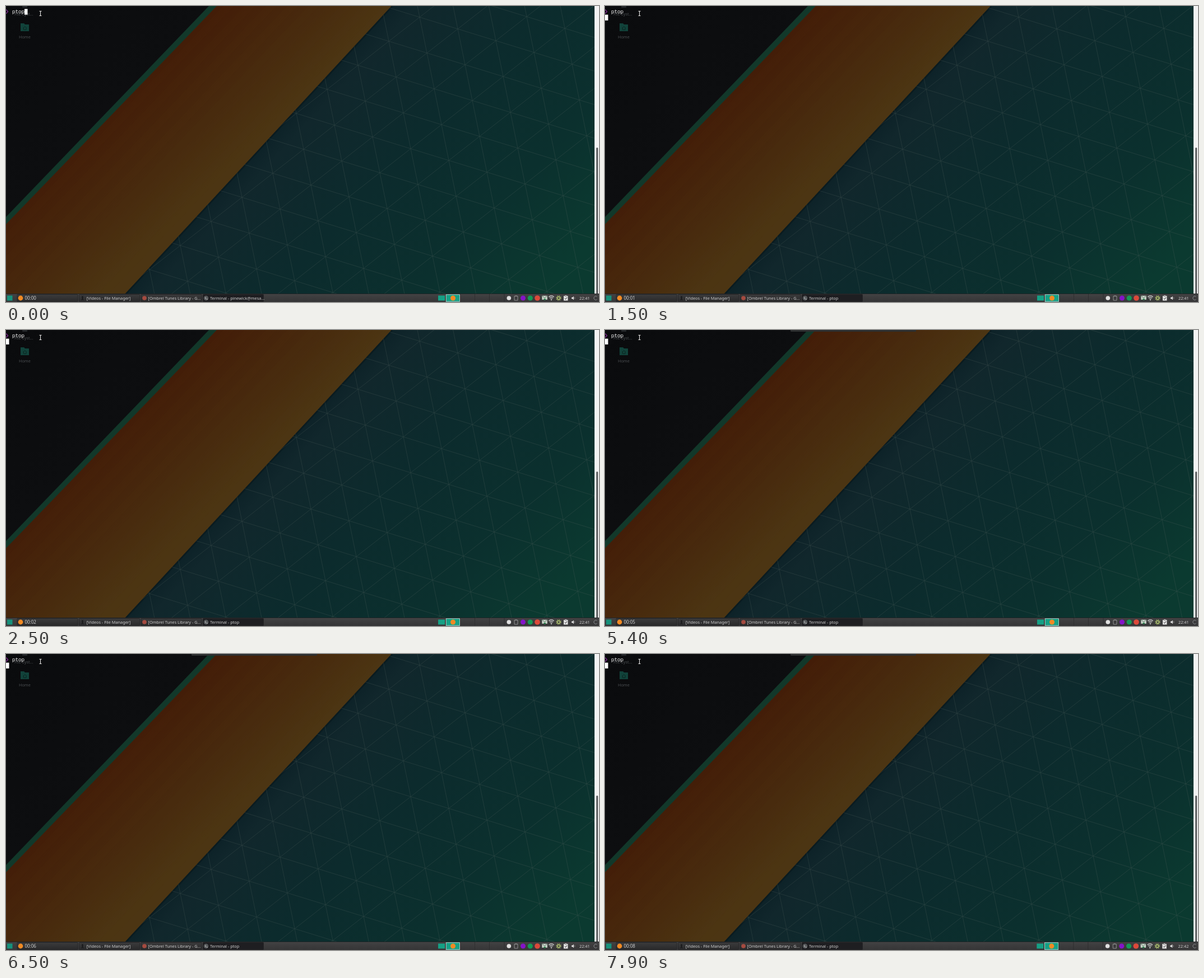
An HTML page that plays this animation: 1058 by 529 pixels, repeating every 8 s.

```html
<!DOCTYPE html>
<html lang="en">
<head>
<meta charset="utf-8">
<title>Terminal desktop</title>
<style>
  html, body { margin: 0; width: 100%; height: 100%; overflow: hidden; background: #0b0c0e; }
  svg { display: block; width: 1058px; height: 529px; }
  text { font: 7.33px "Noto Sans", "Open Sans", sans-serif; fill: #cfcfcf; white-space: pre; }
  .mono { font: 9.2px "Noto Sans Mono", "DejaVu Sans Mono", monospace; fill: #f4f4f4; }
  .dim { fill: #4a4d50; }
</style>
</head>
<body>
<svg viewBox="0 0 1058 529" xmlns="http://www.w3.org/2000/svg">
  <defs>
    <linearGradient id="black" gradientUnits="userSpaceOnUse" x1="0" y1="0" x2="185" y2="190">
      <stop offset="0" stop-color="#0a0b0d"/><stop offset="1" stop-color="#0d0e10"/>
    </linearGradient>
    <linearGradient id="orange" gradientUnits="userSpaceOnUse" x1="188" y1="195" x2="338" y2="346">
      <stop offset="0" stop-color="#431d08"/><stop offset=".5" stop-color="#47280d"/>
      <stop offset="1" stop-color="#4c3513"/>
    </linearGradient>
    <linearGradient id="teal" gradientUnits="userSpaceOnUse" x1="450" y1="257" x2="850" y2="627">
      <stop offset="0" stop-color="#0d2228"/><stop offset=".06" stop-color="#11272c"/>
      <stop offset=".35" stop-color="#0c2b2d"/><stop offset=".7" stop-color="#0b302e"/>
      <stop offset="1" stop-color="#0b3a30"/>
    </linearGradient>
    <linearGradient id="panel" x2="0" y2="1">
      <stop offset="0" stop-color="#4a4a4a"/><stop offset=".15" stop-color="#404041"/>
      <stop offset="1" stop-color="#353536"/>
    </linearGradient>
    <linearGradient id="button" x2="0" y2="1">
      <stop offset="0" stop-color="#3b3b3c"/><stop offset="1" stop-color="#29292a"/>
    </linearGradient>
    <clipPath id="tealArea"><path d="M688 0H1050V515H212Z"/></clipPath>
    <clipPath id="bandArea"><path d="M376 0H688L212 515H0V390Z"/></clipPath>
  </defs>

  <rect width="1050" height="515" fill="url(#black)"/>
  <path d="M362 0H378L0 392V377Z" fill="#12382a"/>
  <path d="M376 0H688L212 515H0V390Z" fill="url(#orange)"/>
  <g id="bands" clip-path="url(#bandArea)" stroke="#5a3a10" stroke-width="14" opacity=".07"/>
  <path d="M688 0H1050V515H212Z" fill="url(#teal)"/>
  <g clip-path="url(#tealArea)">
    <path d="M688 0L212 515" stroke="#071518" stroke-width="5" opacity=".45"/>
    <g id="grid" stroke="#53635f" stroke-width=".7" opacity=".42"/>
  </g>

  <rect x="29" y="0" width="9" height="3" rx="1" fill="#24272a"/>
  <text class="dim" x="15" y="17">File Syst...</text>
  <path d="M26 31H32L34 33H41V45H26Z" fill="#11423a"/>
  <path d="M30.5 39.5L33.7 36.5 37 39.5M31.5 39V42.5H36V39" fill="none" stroke="#0a2521"/>
  <text class="dim" x="23" y="57.5">Home</text>

  <path d="M.3 6.5L3.6 10 .3 13.5" fill="none" stroke="#8b2a9c" stroke-width="1.1"/>
  <text class="mono" x="11" y="13.3">ptop</text>
  <rect id="cursor" width="5.5" height="10.3" fill="#fff"/>
  <g fill="none">
    <path d="M59 9.3H64M61.5 9.3V17.3M59 17.3H64" stroke="#111" stroke-width="2.4"/>
    <path d="M59.5 9.3H63.5M61.5 9.3V17.3M59.5 17.3H63.5" stroke="#eee"/>
  </g>
  <path id="popup" d="M331 0H555V1.5Q555 3 553.5 3H332.5Q331 3 331 1.5Z" fill="#2d2f30"/>

  <rect x="1050" width="8" height="515" fill="#f3f3f3"/>
  <rect x="1053.2" y="253" width="3" height="262" rx="1.5" fill="#56585a"/>

  <rect y="514.5" width="1058" height="14.5" fill="url(#panel)"/>
  <rect y="514" width="1058" height="1" fill="#222426"/>
  <rect x="2" y="517.5" width="9.5" height="9" fill="#17917b"/>
  <g id="buttons"></g>
  <circle cx="26" cy="522" r="4.4" fill="#f08a24"/>
  <text id="counter" x="33.4" y="525" style="font-size:8px"></text>
  <rect x="134" y="518.5" width="5" height="7" fill="#1d1d1e"/>
  <path d="M134.6 519V525M138.4 519V525" stroke="#777" stroke-width=".6" stroke-dasharray="1"/>
  <text x="143.7" y="525">[Videos - File Manager]</text>
  <circle cx="247" cy="522" r="3.8" fill="#a54b40"/>
  <text x="253.5" y="525">[Ombrel Tunes Library - G...</text>
  <circle cx="357" cy="522" r="4.2" fill="#55585a"/>
  <path d="M355 520.2L357 522 355 523.8M357.5 524H360" fill="none" stroke="#ddd" stroke-width=".8"/>
  <text id="title" x="364" y="525"></text>

  <g id="tray">
    <rect x="771" y="517.5" width="12" height="9" fill="#16a085"/>
    <rect x="785.2" y="515.8" width="24.3" height="12.4" fill="#16a085" stroke="#c9e5df" stroke-width=".8"/>
    <circle cx="797.5" cy="522" r="4.5" fill="#f08a24"/>
    <path d="M810.5 515V529M836.5 515V529M862.5 515V529M889 515V529" stroke="#2d2d2e" stroke-width=".8"/>
    <circle cx="897.3" cy="522" r="3.8" fill="#e0e0e0"/>
    <path d="M907 518.5H913V526H907ZM908.5 518H911.5" fill="none" stroke="#929292"/>
    <circle cx="922.5" cy="522" r="4.5" fill="#8414c8"/>
    <circle cx="935.3" cy="522" r="4.6" fill="#139b55"/>
    <circle cx="948" cy="522" r="4.8" fill="#dc493a"/>
    <rect x="956.3" y="517.8" width="9.5" height="7" fill="#c9d4c9"/>
    <path d="M956.5 518L961 521.7 965.6 518" fill="none" stroke="#557260"/>
    <path d="M959 523H963.5L961.2 526.5Z" fill="#28814b"/>
    <g fill="none" stroke="#dedede" stroke-width="1.1">
      <path d="M968.3 520Q973 515.8 977.7 520M969.9 522Q973 519.3 976.1 522M971.5 523.9Q973 522.7 974.5 523.9"/>
    </g>
    <circle cx="973" cy="525.4" r=".9" fill="#dedede"/>
    <circle cx="986" cy="522" r="3.8" fill="none" stroke="#a6b86c" stroke-width="1.8" stroke-dasharray="1.5"/>
    <circle cx="986" cy="522" r="2.3" fill="none" stroke="#a6b86c" stroke-width="1.6"/>
    <path d="M995 518H1002.5V526.5H995Z" fill="#e2e2e2"/>
    <rect x="997" y="517" width="3.6" height="2" fill="#e2e2e2" stroke="#444" stroke-width=".5"/>
    <path d="M996.8 522.5L998.3 524.2 1001 520.8" fill="none" stroke="#333"/>
    <path d="M1009 520.8H1010.7L1013 518.8V525.2L1010.7 523.2H1009Z" fill="#ddd"/>
    <path d="M1014.3 520.3Q1015.6 522 1014.3 523.7" fill="none" stroke="#999" stroke-width=".8"/>
  </g>
  <text id="clock" x="1023" y="525"></text>
  <path d="M1054.6 519.6A3.4 3.4 0 1 0 1054.6 524.4" fill="none" stroke="#85878a"/>
</svg>
<script>
const LOOP = 8000;
const TICKS = [[0, 0], [1500, 1], [2500, 2], [5100, 4], [5400, 5], [6500, 6], [6900, 7], [7900, 8]];
const LAUNCH = 1100, POPUP = 5100, MINUTE = 6900;
const $ = id => document.getElementById(id);

function add(parent, tag, attrs) {
  const el = document.createElementNS("http://www.w3.org/2000/svg", tag);
  for (const key in attrs) el.setAttribute(key, attrs[key]);
  $(parent).append(el);
}

function line(parent, x, y, dx, dy) {
  add(parent, "path", { d: `M${x - dx} ${y - dy}L${x + dx} ${y + dy}` });
}

// Triangular lattice: three families of parallel lines through shared nodes.
const node = [628, 106], u = [68, 21], v = [13, 64];
for (let k = -24; k <= 24; k++) {
  line("grid", node[0] + k * v[0], node[1] + k * v[1], u[0] * 25, u[1] * 25);
  line("grid", node[0] + k * u[0], node[1] + k * u[1], v[0] * 25, v[1] * 25);
  line("grid", node[0] + k * u[0], node[1] + k * u[1], (u[0] - v[0]) * 25, (u[1] - v[1]) * 25);
}

for (let i = 0; i < 8; i++) line("bands", 200 + i * 38, 207, 400, -420);

for (let i = 0; i < 4; i++) {
  add("buttons", "rect", {
    x: 20 + i * 110.5, y: 515.5, width: 108, height: 13, rx: 1,
    fill: i === 3 ? "#1e1e21" : "url(#button)", stroke: "#222223", "stroke-width": .7
  });
}

function setText(id, text) {
  if ($(id).textContent !== text) $(id).textContent = text;
}

function draw() {
  const t = performance.now() % LOOP;
  const seconds = TICKS.filter(([at]) => at <= t).pop()[1];
  const running = t >= LAUNCH, late = t >= MINUTE;
  setText("counter", "00:0" + seconds);
  setText("title", running ? "Terminal - ptop" : "Terminal - pinewick@mesa...");
  setText("clock", late ? "22:42" : "22:41");
  $("clock").setAttribute("x", late ? 1022.6 : 1023);
  $("tray").setAttribute("transform", late ? "translate(-.7 0)" : "");
  $("cursor").setAttribute("x", running ? 0 : 33);
  $("cursor").setAttribute("y", running ? 15.5 : 5.2);
  $("popup").style.display = t >= POPUP ? "" : "none";
  requestAnimationFrame(draw);
}
draw();
</script>
</body>
</html>
```
